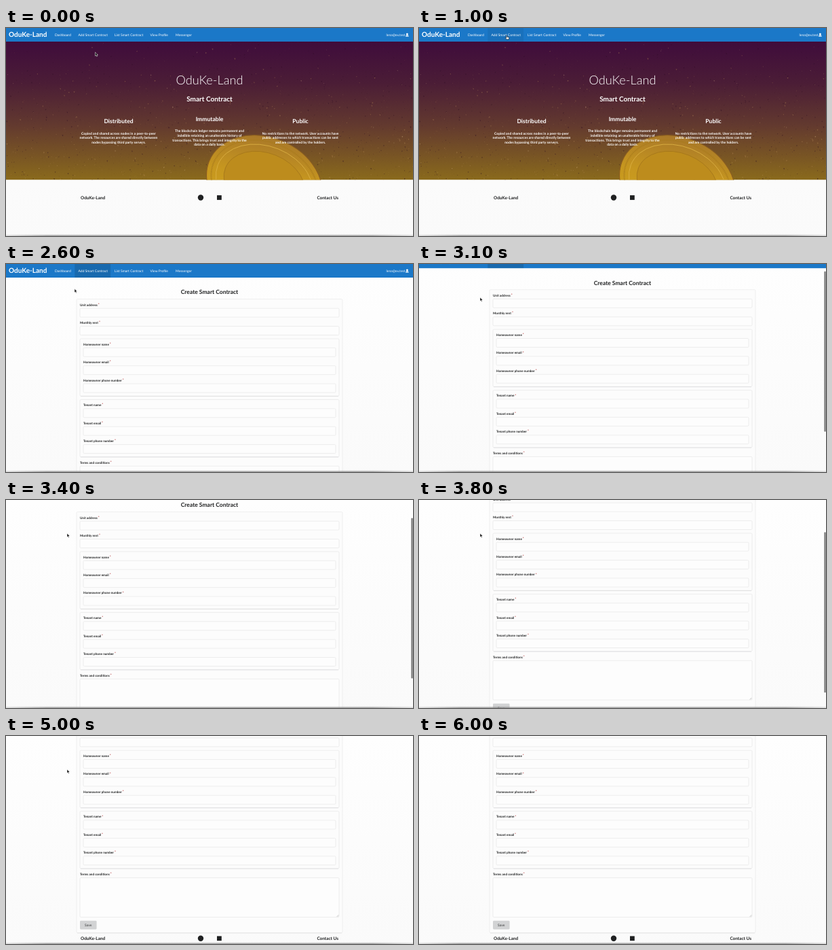
Write an HTML page that moves like this. It is 600 px wide and 306 px high and loops after 6.5 s.

```html
<!DOCTYPE html>
<html lang="en">
<head>
<meta charset="utf-8">
<title>Smart contract form</title>
<style>
  html, body { margin: 0; width: 100%; height: 100%; overflow: hidden; background: #fcfcfc; }
  svg { display: block; width: 100vw; height: 100vh; }
  text { font-family: Lato, "Open Sans", sans-serif; text-rendering: geometricPrecision; }
</style>
</head>
<body>
<svg id="stage" viewBox="0 0 600 306">
  <defs>
    <linearGradient id="sky" x1="0" y1="0" x2="0" y2="1">
      <stop offset="0" stop-color="#3f0c3c"/>
      <stop offset=".3" stop-color="#4b1d36"/>
      <stop offset=".6" stop-color="#62392f"/>
      <stop offset="1" stop-color="#8a6a1c"/>
    </linearGradient>
    <linearGradient id="gold" x1="0" y1="0" x2=".3" y2="1">
      <stop offset="0" stop-color="#a06f2c"/>
      <stop offset=".5" stop-color="#c6961f"/>
      <stop offset="1" stop-color="#cfa51c"/>
    </linearGradient>
    <linearGradient id="paper" x1="0" y1="0" x2="0" y2="1">
      <stop offset="0" stop-color="#fefefe"/>
      <stop offset="1" stop-color="#fafafa"/>
    </linearGradient>
    <linearGradient id="edge" x1="0" y1="0" x2="1" y2="0">
      <stop offset="0" stop-color="#888" stop-opacity=".25"/>
      <stop offset=".1" stop-color="#888" stop-opacity=".75"/>
      <stop offset=".9" stop-color="#888" stop-opacity=".75"/>
      <stop offset="1" stop-color="#888" stop-opacity=".25"/>
    </linearGradient>
    <clipPath id="heroClip"><rect y="20" width="600" height="203.5"/></clipPath>
  </defs>
  <rect width="600" height="306" fill="url(#paper)"/>
  <g id="home"></g>
  <g id="page">
    <g id="form"></g>
    <g id="nav"></g>
  </g>
  <rect id="thumb" x="597.3" width="2.5" height="236" rx="1.2" fill="#7f7f7f"/>
  <rect y="303.6" width="600" height="1" fill="url(#edge)" opacity=".25"/>
  <rect y="304.6" width="600" height="1.4" fill="url(#edge)"/>
  <g id="status">
    <rect x="-2" y="299" width="48" height="8" rx="1" fill="#3a3a3c"/>
    <text x="1" y="304.2" font-size="4.7" fill="#eee">localhost:3004/#/add</text>
  </g>
  <g id="cursor" stroke-linejoin="round">
    <path id="arrow" d="M0 0V5.4L1.3 4.3 2.2 6.2 3.1 5.8 2.3 3.9H4Z" fill="#111" stroke="#fff" stroke-width=".5"/>
    <path id="hand" d="M-.5 .4Q0 -.4 .5 .4V2.3L3 2.9Q3.6 3.2 3.4 4L2.8 6H-.3L-2 3.7Q-1.8 2.9-1.1 3.3L-.5 3.8Z" fill="#fff" stroke="#111" stroke-width=".6"/>
  </g>
</svg>
<script>
const LOOP = 6500, STEP = 100;
const BRAND = "OduKe-Land", INK = "#1f2021";
const $ = id => document.getElementById(id);

function add(parent, tag, attrs, content = "") {
  const el = document.createElementNS("http://www.w3.org/2000/svg", tag);
  for (const key in attrs) el.setAttribute(key, attrs[key]);
  el.textContent = content;
  parent.append(el);
  return el;
}

// y is the visual middle of the capitals.
function label(parent, str, x, y, size, { fill = INK, weight = 700, anchor = "start" } = {}) {
  return add(parent, "text", {
    x, y: y + size * .36, "font-size": size, "font-weight": weight, fill, "text-anchor": anchor
  }, str);
}

function box(parent, x, y, width, height, attrs = {}) {
  return add(parent, "rect", {
    x, y, width, height, rx: 1.4, fill: "#fdfdfd", stroke: "#dcdcdd", "stroke-width": .5, ...attrs
  });
}

function footer(parent, y) {
  label(parent, BRAND, 110, y, 6.43);
  label(parent, "Contact Us", 490, y, 6.43, { anchor: "end" });
  add(parent, "circle", { cx: 287, cy: y, r: 4.2, fill: INK });
  add(parent, "rect", { x: 311, y: y - 3.4, width: 6.8, height: 6.8, fill: INK });
}

function random(seed) {
  return () => (seed = seed * 16807 % 2147483647) / 2147483647;
}

function specks(parent, fill, count, seed, opacity) {
  const rnd = random(seed);
  let d = "";
  for (let i = 0; i < count; i++) {
    const x = 600 * rnd(), y = 20 + 204 * Math.pow(rnd(), .6);
    const s = .4 + 1.7 * Math.pow(rnd(), 3), k = s * (rnd() - .5);
    d += `M${x.toFixed(1)} ${y.toFixed(1)}l${s.toFixed(2)} ${k.toFixed(2)} ${(-s / 2).toFixed(2)} ${s.toFixed(2)}z`;
  }
  add(parent, "path", { d, fill, opacity });
}

function buildHome() {
  const home = $("home");
  const hero = add(home, "g", { "clip-path": "url(#heroClip)" });
  add(hero, "rect", { y: 20, width: 600, height: 203.5, fill: "url(#sky)" });
  specks(hero, "#2a0d20", 1200, 41, .5);
  specks(hero, "#b58a55", 900, 977, .45);
  specks(hero, "#d9b98a", 150, 5003, .45);

  const coin = add(hero, "g", { transform: "translate(381 229) rotate(22)" });
  const ring = (rx, ry, fill, stroke, width, dash = "none") => add(coin, "ellipse", {
    rx, ry, fill, stroke, "stroke-width": width, "stroke-dasharray": dash
  });
  ring(88, 68, "url(#gold)", "#8a5d20", 1.2);
  ring(81, 61, "none", "#a87a1c", 2.2, "1 1.2");
  ring(74, 55, "none", "#dbb043", .8);
  ring(62, 45, "#bd8c1d", "#a5771b", .8);

  const white = { fill: "#fff", anchor: "middle" };
  label(home, BRAND, 300, 76.5, 18.2, { ...white, weight: 300 });
  label(home, "Smart Contract", 300, 104.5, 10, white);
  [
    [166, 137, "Distributed", [
      "Copied and shared across nodes in a peer-to-peer",
      "network. The resources are shared directly between",
      "nodes bypassing third party servers."]],
    [300, 133.5, "Immutable", [
      "The blockchain ledger remains permanent and",
      "indelible retaining an unalterable history of",
      "transactions. This brings trust and integrity to the",
      "data on a daily basis."]],
    [434, 137, "Public", [
      "No restrictions to the network. User accounts have",
      "public addresses to which transactions can be sent",
      "and are controlled by the holders."]]
  ].forEach(([x, y, title, lines]) => {
    label(home, title, x, y, 8.57, white);
    lines.forEach((line, i) => label(home, line, x, y + 18 + i * 6.6, 5, white));
  });
  footer(home, 249.5);
}

function field(parent, name, x, y, height = 13) {
  const text = label(parent, name, x, y, 4.64);
  add(text, "tspan", { fill: "#b03030", dx: 1, dy: -.8 }, "*");
  box(parent, x, y + 5.2, 600 - 2 * x, height);
}

function buildForm() {
  const form = $("form");
  label(form, "Create Smart Contract", 300, 41.3, 8.5, { anchor: "middle" });
  box(form, 104, 51.6, 392, 326.6, { fill: "#fcfcfc", stroke: "#e0e0e1" });
  add(form, "path", { d: "M105 378.7H495", stroke: "#d4d4d5", "stroke-width": .5 });
  field(form, "Unit address", 109, 60);
  field(form, "Monthly rent", 109, 86.4);
  ["Homeowner", "Tenant"].forEach((who, g) => {
    const top = 110 + g * 89.5;
    box(form, 109, top, 382, 84.2, { fill: "#fcfcfc" });
    add(form, "path", { d: `M110 ${top + 84.6}H490`, stroke: "#cfcfd0", "stroke-width": .5 });
    ["name", "email", "phone number"].forEach((what, i) =>
      field(form, `${who} ${what}`, 114, top + 8.1 + i * 26.4));
  });
  field(form, "Terms and conditions", 109, 292.1, 58);
  add(form, "path", { d: "M487.6 354.6l2.6-2.6M489.1 354.6l1.1-1.1", stroke: "#888", "stroke-width": .4 });
  box(form, 109, 360.6, 24.6, 12.6, { fill: "#d2d3d4", stroke: "none" });
  label(form, "Save", 121.3, 366.9, 5, { fill: "#5c5d5e", anchor: "middle" });
  footer(form, 386.6);
}

function buildNav() {
  const nav = $("nav"), white = { fill: "#fff" };
  add(nav, "rect", { width: 600, height: 20, fill: "#1b78c8" });
  const tab = add(nav, "rect", { x: 101.3, width: 52.8, height: 20, fill: "#000" });
  label(nav, BRAND, 4, 9.8, 10, white);
  [[72, "Dashboard"], [106.5, "Add Smart Contract"], [160, "List Smart Contract"],
   [212.5, "View Profile"], [250, "Messenger"]
  ].forEach(([x, name]) => label(nav, name, x, 10.3, 5, { ...white, weight: 400 }));
  label(nav, "lena@ex.test", 588.5, 10.3, 5, { ...white, weight: 400, anchor: "end" });
  add(nav, "circle", { cx: 591.4, cy: 9, r: 1.5, fill: "#fff" });
  add(nav, "path", { d: "M589 12.6Q589 10.4 591.4 10.4T593.8 12.6Z", fill: "#fff" });
  return tab;
}

function along(keys, t) {
  const i = keys.findIndex(key => key[0] > t);
  if (i < 0) return keys[keys.length - 1].slice(1);
  if (i === 0) return keys[0].slice(1);
  const [a, b] = [keys[i - 1], keys[i]], u = (t - a[0]) / (b[0] - a[0]);
  return a.slice(1).map((v, n) => v + (b[n + 1] - v) * u);
}

const POINTER = [[0, 131.5, 35.7], [300, 131.2, 30], [700, 129.6, 13], [900, 129.4, 11.5],
  [1000, 129.4, 10.8], [1300, 126, 10], [2300, 126, 10], [2500, 112, 24], [2700, 90, 49.2]];
const SCROLL = [[2800, 0], [2900, 2.5], [3000, 7.5], [3100, 13.8], [3800, 61.1],
  [4200, 88.6], [4300, 89.7], [4800, 89.7], [4900, 88.8]];

function show(id, on) {
  $(id).setAttribute("visibility", on ? "visible" : "hidden");
}

function render(now) {
  const t = Math.floor(now % LOOP / STEP) * STEP;
  const onForm = t >= 1300;
  const [x, y] = along(POINTER, t);
  const [scroll] = along(SCROLL, t);
  const hover = y < 20;

  show("home", !onForm);
  show("form", onForm);
  $("page").setAttribute("transform", `translate(0 ${-scroll})`);
  tab.setAttribute("opacity", onForm ? .13 : hover ? .06 : 0);
  show("status", hover && t >= 1400);
  show("thumb", t >= 2900 && t < 4900);
  $("thumb").setAttribute("y", scroll * .775);
  $("cursor").setAttribute("transform", `translate(${x} ${y})`);
  show("arrow", !hover && t < 5800);
  show("hand", hover);
}

buildHome();
buildForm();
const tab = buildNav();

function tick() {
  render(performance.now());
  requestAnimationFrame(tick);
}
tick();
</script>
</body>
</html>
```
